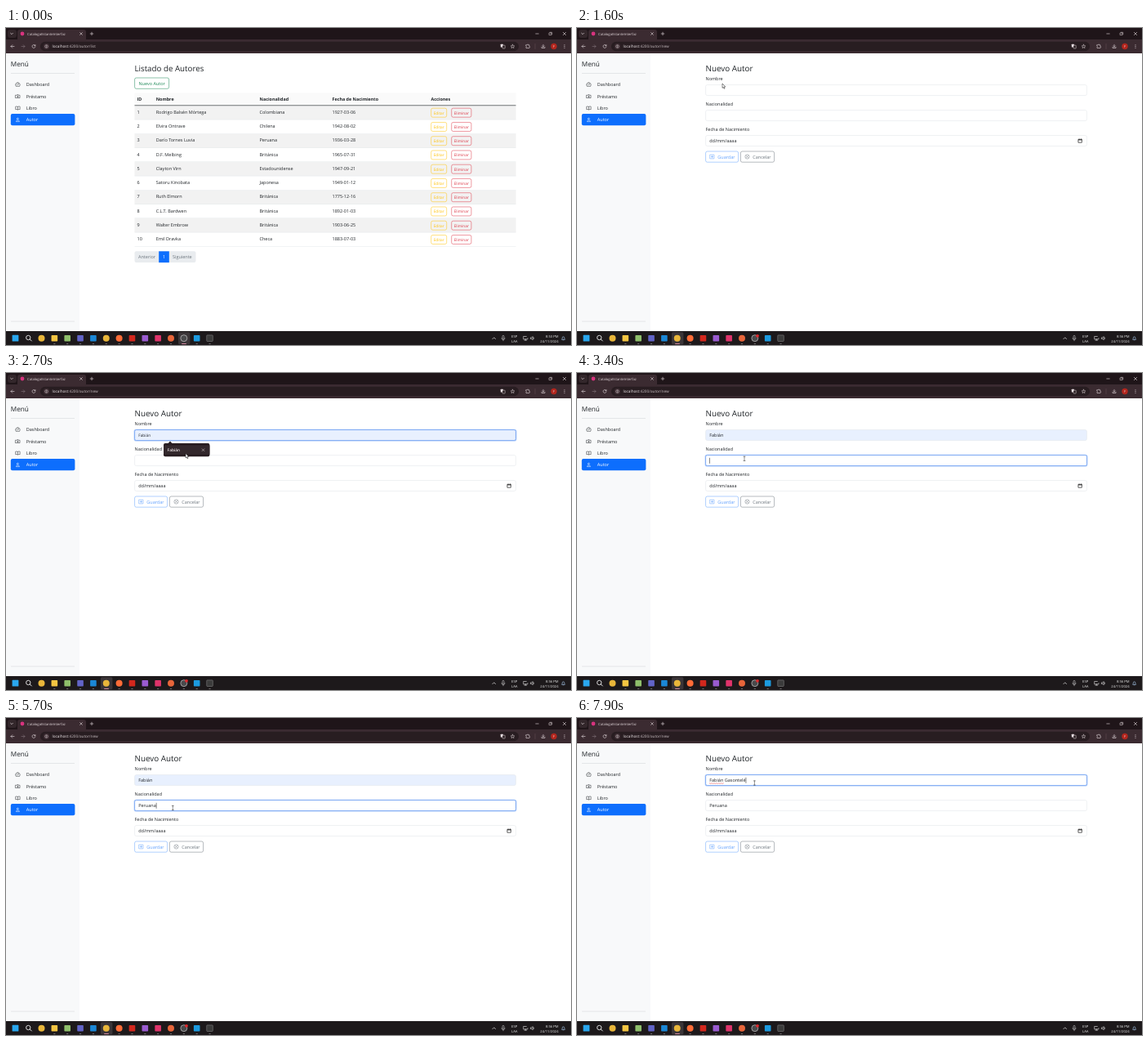
Animation, 692 px wide and 388 px high, one loop 8 s. Source, as an HTML page:

```html
<!DOCTYPE html>
<html lang="es">
<head>
<meta charset="utf-8">
<title>Autores</title>
<style>
html, body { margin: 0; width: 100%; height: 100%; overflow: hidden; background: #fff; }
svg { display: block; width: 100%; height: 100%; }
text { font-family: "Open Sans", "Noto Sans", sans-serif; white-space: pre; text-rendering: geometricPrecision; }
</style>
</head>
<body>
<svg id="stage" viewBox="0 0 692 388"></svg>
<script>
const LOOP = 8000, STEP = 100, BODY = 5.5;
const INK = '#212529', BLUE = '#0d6efd', GRAY = '#6c757d', LINE = '#dee2e6';
const FIRST = 'Fabián', LAST = 'Gasontelé', COUNTRY = 'Peruana';
const AUTHORS = [
  ['Rodrigo Balsén Mórtega', 'Colombiana', '1927-03-06'],
  ['Elvira Ontrave', 'Chilena', '1942-08-02'],
  ['Darío Tornes Luvia', 'Peruana', '1936-03-28'],
  ['D.F. Melbing', 'Británica', '1965-07-31'],
  ['Clayton Virn', 'Estadounidense', '1947-09-21'],
  ['Satoru Kinobata', 'Japonesa', '1949-01-12'],
  ['Ruth Elmorn', 'Británica', '1775-12-16'],
  ['C.L.T. Bardwen', 'Británica', '1892-01-03'],
  ['Walter Embrow', 'Británica', '1903-06-25'],
  ['Emil Dravka', 'Checa', '1883-07-03']
];

const rect = (x, y, w, h, fill, r = 0, extra = '') =>
  `<rect x="${x}" y="${y}" width="${w}" height="${h}" rx="${r}" fill="${fill}" ${extra}/>`;
const circle = (x, y, r, fill, extra = '') => `<circle cx="${x}" cy="${y}" r="${r}" fill="${fill}" ${extra}/>`;
const text = (x, y, s, fill = INK, size = BODY, extra = '') =>
  `<text x="${x}" y="${y}" fill="${fill}" font-size="${size}" ${extra}>${s}</text>`;
const line = (d, color, width = .6, x = 0, y = 0) =>
  `<path transform="translate(${x} ${y})" d="${d}" fill="none" stroke="${color}" stroke-width="${width}" stroke-linecap="round" stroke-linejoin="round"/>`;
const outline = (x, y, w, h, color, fill = 'none', width = .5) =>
  rect(x, y, w, h, fill, 2, `stroke="${color}" stroke-width="${width}"`);
const cross = (x, y, r, color, width = .6) => line(`M${-r} ${-r}L${r} ${r}M${r} ${-r}L${-r} ${r}`, color, width, x, y);

const measurer = document.createElement('canvas').getContext('2d');
function textWidth(s) {
  measurer.font = `${BODY * 100}px "Open Sans", "Noto Sans", sans-serif`;
  return measurer.measureText(s).width / 100;
}

function browserBar(path) {
  const c = '#e6dcdf';
  return rect(0, 0, 692, 31, '#1f1519') + rect(0, 14, 692, 17, '#3b2b31') +
    rect(2, 2, 11, 10, '#33272b', 3) + line('M-1.4-.7L0 .7L1.4-.7', c, .7, 7, 7) +
    rect(14, 2, 84, 15, '#3b2b31', 3) + circle(20, 7, 2.4, '#d8337f') +
    text(26, 8.7, 'CatalogoEstanteInterfaz', c, 4.2) +
    cross(92, 7, 1.4, c) + line('M-1.8 0H1.8M0-1.8V1.8', c, .6, 105, 7) +
    line('M-1.7 0H1.7', c, .6, 650.5, 7) + line('M-1.6-1H1V1.6H-1.6ZM-.8-1.7H1.7V.8', c, .5, 667, 7) + cross(684, 7, 1.7, c) +
    line('M2 0H-2M-.2-1.8L-2 0L-.2 1.8', c, .6, 8, 22.5) + line('M-2 0H2M.2-1.8L2 0L.2 1.8', '#85767c', .6, 21, 22.5) +
    line('M1.8-1A2 2 0 1 0 2 .4M1.9-2V-.8H.6', c, .6, 34, 22.5) +
    rect(42, 16.8, 586, 11.4, '#281d21', 5.7) + circle(49.5, 22.5, 3.8, '#3b2b31') +
    circle(49.5, 22.5, 1.8, 'none', `stroke="${c}" stroke-width=".5"`) + line('M0 0V.9M0-.9V-.8', c, .5, 49.5, 22.5) +
    text(56.6, 24.3, `localhost<tspan fill="#cabfc3">:4200/autor/${path}</tspan>`, '#f4edef', 4.7) +
    rect(605.8, 19.8, 3.2, 3.8, c, .4) + outline(608, 21.2, 3.2, 3.8, c, '#281d21', .5).replace('rx="2"', 'rx=".4"') +
    line('M0-2.3L.7-.7L2.3-.6L1.1.5L1.5 2.1L0 1.2L-1.5 2.1L-1.1.5L-2.3-.6L-.7-.7Z', c, .5, 620.5, 22.5) +
    line('M-2-1.5H-.7A.8.8 0 0 1 .9-1.5H1.8V.1A.8.8 0 0 1 1.8 1.7V2.2H-2V1A.8.8 0 0 0-2-.4Z', c, .6, 639, 22.3) +
    line('M0-3V3', '#6a5259', .5, 648, 22.5) +
    line('M0-2V.8M-1.3-.4L0 .9L1.3-.4M-2 1V2.2H2V1', c, .6, 658, 22.3) +
    circle(671, 22.5, 3.7, '#b3261e') + text(671, 24, 'F', '#f3dcd9', 4, 'text-anchor="middle"') +
    [-1.8, 0, 1.8].map(d => circle(684, 22.5 + d, .5, c)).join('');
}

function sidebar() {
  const icons = [
    'M-2.4 1.8A2.8 2.8 0 1 1 2.4 1.8ZM0 .6L1.2-.8M-1.6 0H-1.3M0-1.6V-1.4',
    'M-2.6-1.3H-1L-.6-2H.6L1-1.3H2.6V2H-2.6ZM0-.6V1.3M-.9.4H.9',
    'M0-1.5Q-1.4-2.3-2.7-1.7V1.8Q-1.4 1.3 0 2Q1.4 1.3 2.7 1.8V-1.7Q1.4-2.3 0-1.5V2',
    'M-1-1.1A1 1 0 1 1 1-1.1A1 1 0 1 1-1-1.1M-2 2Q-1.8.6 0 .6T2 2Z'
  ];
  return rect(0, 31, 90, 340, '#f8f9fa') + text(5.8, 47.2, 'Menú', INK, 8.2) +
    rect(6, 55.5, 78, .5, '#cfd2d4') + rect(6, 358.8, 78, .5, '#cfd2d4') + rect(5.8, 105, 78.6, 14.2, BLUE, 2) +
    ['Dashboard', 'Préstamo', 'Libro', 'Autor'].map((label, i) => {
      const color = i === 3 ? '#fff' : INK, y = 69.2 + i * 14.35;
      return line(icons[i], color, .5, 14.4, y) + text(24.8, y + 2, label, color);
    }).join('');
}

function listPage(hover) {
  const cols = [160.5, 183.7, 310.5, 399.5, 520.5], top = 95, rowHeight = 17.25;
  const action = (x, y, w, label, color) =>
    outline(x, y + 3.2, w, 11, color) + text(x + w / 2, y + 10.5, label, color, 4.75, 'text-anchor="middle"');
  const rows = AUTHORS.map((author, i) => {
    const y = top + i * rowHeight;
    return (i % 2 ? '' : rect(157.5, y, 467, rowHeight, '#f2f2f2')) + rect(157.5, y + rowHeight - .4, 467, .4, LINE) +
      [i + 1, ...author].map((s, k) => text(cols[k], y + 9.8, s)).join('') +
      action(520.7, y, 19, 'Editar', '#ffc107') + action(545.7, y, 24.2, 'Eliminar', '#dc3545');
  }).join('');
  return text(157.5, 52.6, 'Listado de Autores', INK, 9.75, 'font-weight="500"') +
    outline(157.6, 61, 42, 13.3, '#198754', hover ? '#198754' : 'none') +
    text(178.6, 69.8, 'Nuevo Autor', hover ? '#fff' : '#198754', BODY, 'text-anchor="middle"') +
    rect(157.5, 79.5, 467, 15.5, '#fafafa') +
    ['ID', 'Nombre', 'Nacionalidad', 'Fecha de Nacimiento', 'Acciones']
      .map((s, k) => text(cols[k], 89.4, s, INK, 5.4, 'font-weight="700"')).join('') +
    rows + rect(157.5, 94.4, 467, .8, '#4d5154') +
    rect(157.5, 273.3, 75, 13.8, '#e9ecef', 2) + rect(187.2, 273.3, 12.6, 13.8, BLUE) +
    text(162, 282.3, 'Anterior', GRAY) + text(193.5, 282.3, '1', '#fff', BODY, 'text-anchor="middle"') + text(204, 282.3, 'Siguiente', GRAY);
}

function input(y, value, { focus, filled, caret, size = BODY } = {}) {
  return (focus ? rect(156.6, y - .9, 468.8, 14.8, '#b6d0fb', 2.6) : '') +
    outline(157.6, y, 466.8, 13, focus ? '#6a9cf0' : LINE, filled ? '#e8f0fe' : '#fff', focus ? .8 : .5) +
    text(162.2, y + 8.6, value, INK, size) +
    (caret ? rect(162.3 + textWidth(value), y + 3.2, .5, 7, '#111') : '');
}

function formPage(s) {
  const labels = ['Nombre', 'Nacionalidad', 'Fecha de Nacimiento'];
  const underline = Array.from({ length: 13 }, (_, i) => `${i ? 'L' : 'M'}${162.3 + i * textWidth(FIRST) / 12} ${79.8 + i % 2 * .5}`).join('');
  return text(157.5, 52.6, 'Nuevo Autor', INK, 9.85, 'font-weight="500"') +
    labels.map((label, i) => text(157.5, 64.4 + i * 31, label)).join('') +
    input(69.6, s.name, s.nameField) + input(100.6, s.country, s.countryField) + input(131.5, 'dd/mm/aaaa') +
    (s.underline ? line(underline, '#e23b3b', .5) : '') +
    line('M-2-1.6H2V2.2H-2ZM-2-1H2M-1.2-2.2V-1.6M1.2-2.2V-1.6', '#222', .7, 616.3, 138) +
    `<g opacity=".65">${outline(157.6, 151, 40, 13.2, BLUE)}${line('M-2.4-2.4H2.4V2.4H-2.4ZM-1.3 0H1.3M0-1.3V1.3', BLUE, .5, 165.5, 157.5)}${text(172.3, 159.6, 'Guardar', BLUE)}</g>` +
    outline(200.4, 151, 41.2, 13.2, GRAY) + circle(208.5, 157.5, 2.6, 'none', `stroke="${GRAY}" stroke-width=".5"`) +
    cross(208.5, 157.5, 1, GRAY, .5) + text(215.3, 159.6, 'Cancelar', GRAY) +
    (s.popup ? popup(s.preview) : '');
}

function popup(hover) {
  return `<path d="M197.6 87L201 83.6L204.4 87Z" fill="#281d21"/>` + rect(193, 86, 56.4, 16.2, '#281d21', 2) +
    (hover ? rect(193, 88.6, 56.4, 11, '#33282c') : '') +
    text(197.6, 95.8, FIRST, '#f1e8eb', 4.8, 'font-weight="600"') + cross(241.5, 94.2, 1.4, '#e6dcdf', .5);
}

function taskbar(recording, clock) {
  const c = '#e8e8e8', y = 379.7, active = recording ? 123 : 218;
  const colors = ['#e9b63a', '#f5c542', '#8fbf6b', '#6264c7', '#1b87d6', '#e9b63a', '#ff6c37', '#d3271d',
    '#9a5bd0', '#e0336b', '#e8653a', '#4a4a4c', '#1c9be0', '#3b3b3b'];
  const apps = colors.map((color, i) => {
    const x = 43.5 + i * 15.85, round = [0, 5, 6, 10, 11].includes(i);
    const mark = round ? circle(x, y, 4, color, i === 11 ? 'stroke="#ddd" stroke-width=".6"' : '')
      : rect(x - 3.8, y - 3.8, 7.6, 7.6, color, .8, i === 13 ? 'stroke="#aaa" stroke-width=".4"' : '');
    return mark + (i ? rect(x - 1.2, 386, 2.4, .8, '#8f8a8c', .4) : '');
  }).join('');
  return rect(0, 371, 692, 17, '#1d191b') + rect(active - 7, 372.2, 14.4, 15, '#3b3538', 1.5) +
    rect(7.6, 375.8, 7.8, 7.8, '#2aa7ee', .6) + circle(27.3, 379, 2.7, 'none', `stroke="${c}" stroke-width=".9"`) +
    line('M2 2L4 4', c, 1, 27.3, 379) + apps +
    rect(active - 3, 386, 6, .9, '#d58aa2', .4) + (recording ? circle(221, 376.8, 1.9, '#e0262b') : '') +
    line('M-1.8.9L0-.9L1.8.9', c, .7, 597.7, y) +
    rect(608, 376.4, 2, 4, 'none', 1, `stroke="${c}" stroke-width=".5"`) + line('M-2 0A2 2 0 0 0 2 0M0 2V3.2', c, .5, 609, 379.6) +
    text(622.7, 378.8, 'ESP', c, 4.2, 'text-anchor="middle"') + text(622.7, 384.5, 'LAA', c, 4.2, 'text-anchor="middle"') +
    line('M1-2.2H-2.6V1.2H2.6V0M-1.4 2.4H1.4M0 1.2V2.4', c, .6, 636.3, y) +
    line('M-2-.8H-1L.4-2V2L-1 .8H-2ZM1.4-1Q2.2 0 1.4 1', c, .6, 644.8, y) +
    text(676.6, 378.8, clock, c, 4.2, 'text-anchor="end"') + text(676.6, 384.5, '24/11/2024', c, 4.2, 'text-anchor="end"') +
    line('M-1.8 1.3Q-1.2.6-1.2-.6A1.2 1.3 0 0 1 1.2-.6Q1.2.6 1.8 1.3ZM-.5 2.1H.5', '#a9cdf0', .6, 682.6, y);
}

// Pointer stops: time, x, y
const POINTER = [
  [100, 222, 376], [600, 205, 140], [700, 205, 140], [1200, 178, 68], [1600, 178, 68], [2100, 214, 78],
  [2500, 214, 78], [2700, 220, 98.5], [2900, 220, 98.5], [3300, 205, 104.8], [4100, 205, 104.8],
  [4500, 204.3, 110], [5900, 204.3, 110], [6200, 217.4, 79.5], [LOOP, 217.4, 79.5]
];

function pointer(t) {
  if (t < POINTER[0][0]) return '';
  const k = POINTER.findIndex(p => p[0] > t);
  const [a, b] = [POINTER[k - 1], POINTER[k]];
  const p = (t - a[0]) / (b[0] - a[0]), ease = p * p * (3 - 2 * p);
  const x = a[1] + (b[1] - a[1]) * ease, y = a[2] + (b[2] - a[2]) * ease;
  const beam = (t >= 1800 && t < 2600) || t >= 3200;
  return beam ? line('M-1-2.6H1M0-2.6V2.6M-1 2.6H1', '#222', .5, x, y)
    : `<path transform="translate(${x} ${y})" d="M0 0V5.4L1.2 4.3L2.1 6.3L3 5.9L2.1 4H3.8Z" fill="#fff" stroke="#111" stroke-width=".5"/>`;
}

const typed = (word, times, t) => word.slice(0, times.filter(at => at <= t).length);
const COUNTRY_KEYS = [4500, 4700, 4900, 5100, 5300, 5500, 5700];
const NAME_KEYS = [6500, 6700, 7000, 7100, 7200, 7300, 7400, 7500, 7500, 7900];

function formState(t) {
  const preview = t >= 2600 && t < 2900, editing = t >= 6200;
  return {
    name: t < 2600 ? '' : FIRST + typed(' ' + LAST, NAME_KEYS, t),
    nameField: {
      focus: (t >= 2100 && t < 3300) || editing,
      filled: t >= 2600 && t < NAME_KEYS[0],
      caret: (t >= 2100 && t < 2600) || editing,
      size: preview ? 4.8 : BODY
    },
    country: typed(COUNTRY, COUNTRY_KEYS, t),
    countryField: { focus: t >= 3300 && !editing, caret: t >= 3300 && !editing && !(t >= 3800 && t < 4300) },
    underline: editing, popup: t >= 2200 && t < 2900, preview
  };
}

function scene(t) {
  const listing = t < 1400;
  return rect(0, 0, 692, 388, '#fff') + browserBar(listing ? 'list' : 'new') + sidebar() +
    (listing ? listPage(t >= 1100) : formPage(formState(t))) +
    taskbar(t >= 100, t < 800 ? '8:53 PM' : '8:56 PM') + pointer(t);
}

const stage = document.getElementById('stage');
let shown = -1;
function tick() {
  const t = Math.floor(performance.now() % LOOP / STEP) * STEP;
  if (t !== shown) stage.innerHTML = scene(shown = t);
  requestAnimationFrame(tick);
}
tick();
</script>
</body>
</html>
```
